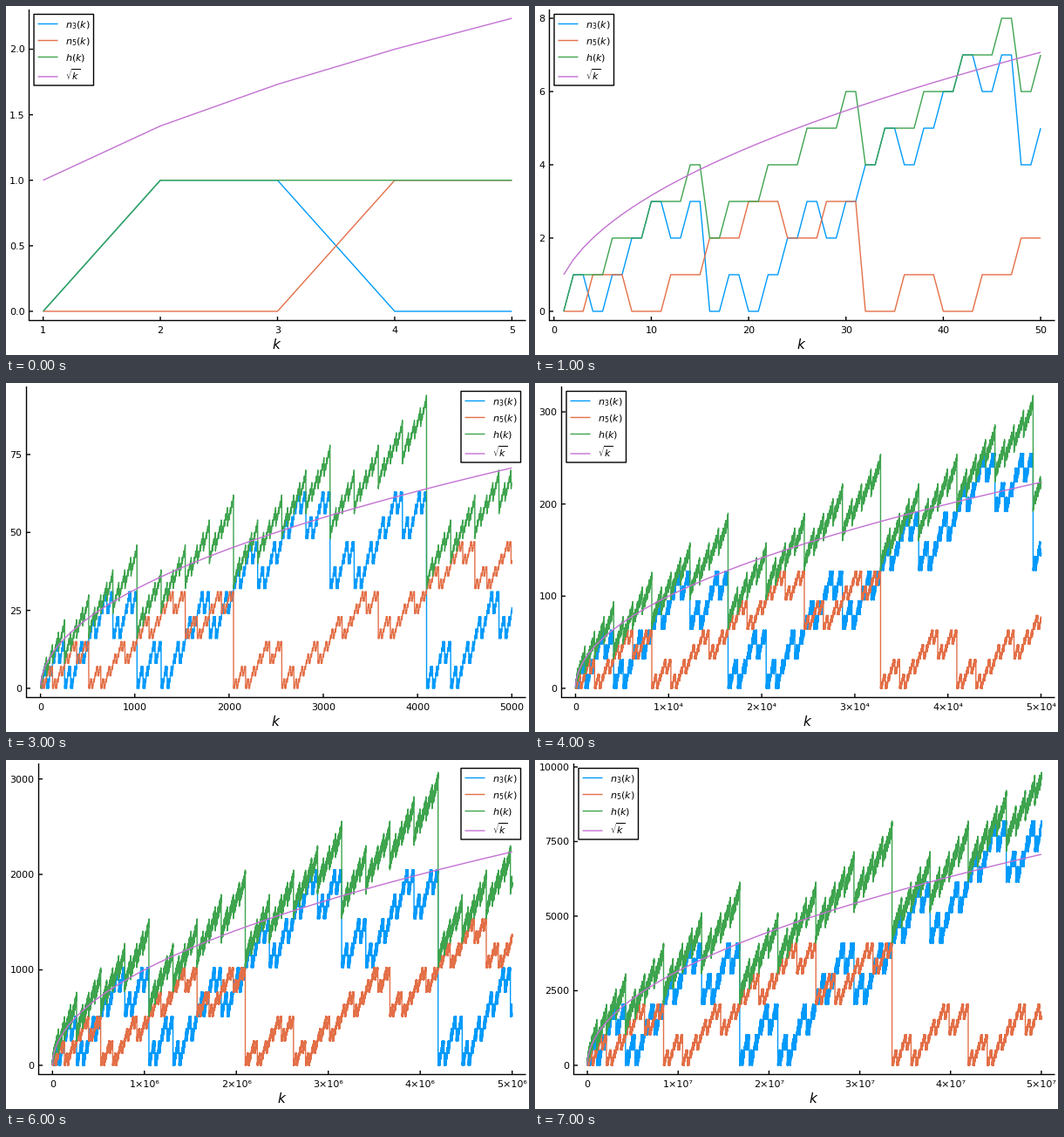
Animation, 600 px wide and 400 px high, one loop 8 s. Source, as a matplotlib script:

```python
import numpy as np
import matplotlib.pyplot as plt
from matplotlib.animation import FuncAnimation
from matplotlib.patches import Rectangle

W, H, DPI = 600, 400, 100
TOP, BOTTOM, RIGHT = 4, 360, 596
PAD = 0.03
BLUE, ORANGE, GREEN, PURPLE = "#009afa", "#e36f47", "#3ea44e", "#c371d2"
SERIES = [("$n_3(k)$", BLUE), ("$n_5(k)$", ORANGE),
          ("$h(k)$", GREEN), (r"$\sqrt{k}$", PURPLE)]
ROWS = (20.5, 39.5, 58.5, 81)
SUPERSCRIPT = "⁰¹²³⁴⁵⁶⁷⁸⁹"

# y tick step, left edge of the axes, legend on the right
VIEWS = [(0.5, 26, False), (2, 16, False), (5, 23, False), (25, 23, True),
         (100, 30, False), (200, 30, False), (1000, 37, True), (2500, 44, False)]

plt.rcParams.update({"font.family": "DejaVu Sans", "mathtext.fontset": "dejavusans",
                     "path.simplify": False})

fig = plt.figure(figsize=(W / DPI, H / DPI), dpi=DPI, facecolor="white")
ax = fig.add_axes([0, 0, 1, 1])


def every_other_bit(k, first):
    """Number formed by bits first, first + 2, first + 4, ... of k."""
    return sum(((k >> b) & 1) << ((b - first) // 2) for b in range(first, 27, 2))


def sample(n):
    """First and last k of short binary blocks: they hold each block's extremes."""
    block = 1
    while block * 16000 < n:
        block *= 2
    start = np.arange(0, n + 1, block)
    k = np.unique(np.concatenate([start, start + block - 1, [1, n]]))
    return k[(k >= 1) & (k <= n)]


def line(x, y, color, z=2):
    ax.plot(x, y, color=color, lw=1, zorder=z, snap=False,
            solid_capstyle="butt", solid_joinstyle="round")


def label(x, y, s, size=8, ha="center"):
    ax.text(x, y, s, fontsize=size, ha=ha, va="baseline", color="black", zorder=6)


def x_label(i, power):
    if i == 0:
        return "0"
    if power < 4:
        return str(i * 10 ** power)
    return f"{i}×10{SUPERSCRIPT[power]}"


def legend(x):
    ax.add_patch(Rectangle((x + 0.5, 9.5), 68.5, 81.5, fc="white", ec="black",
                           lw=1, joinstyle="round", snap=False, zorder=4))
    for (name, color), y in zip(SERIES, ROWS):
        line([x + 5, x + 28], [y, y], color, z=5)
        label(x + 36, y + 4.4, name, ha="left")


def draw(power):
    ax.clear()
    ax.set(xlim=(0, W), ylim=(H, 0))
    ax.axis("off")

    step, left, legend_right = VIEWS[power]
    n = 5 * 10 ** power
    k = sample(n)
    n3, n5 = every_other_bit(k, 1), every_other_bit(k, 2)
    curves = [n3, n5, n3 + n5, np.sqrt(k)]
    peak = max(c.max() for c in curves)

    def to_x(v):
        return left + 0.5 + (RIGHT - left) * ((v - 1) / (n - 1) + PAD) / (1 + 2 * PAD)

    def to_y(v):
        return BOTTOM - (BOTTOM - TOP) * (v / peak + PAD) / (1 + 2 * PAD)

    for c, (_, color) in zip(curves, SERIES):
        line(to_x(k), to_y(c), color)

    line([left + 0.5] * 2, [TOP, BOTTOM + 1], "black", z=3)
    line([left, RIGHT + 0.5], [BOTTOM + 0.5] * 2, "black", z=3)

    for i in range(1 if power == 0 else 0, 6):
        x = to_x(i * 10 ** power)
        line([x, x], [BOTTOM, BOTTOM - 4], "black", z=3)
        label(x, 375, x_label(i, power))

    top_value = peak * (1 + PAD)
    for v in np.arange(0, top_value, step):
        y = to_y(v)
        line([left, left + 5], [y, y], "black", z=3)
        label(left - 4.5, y + 3.95, f"{v:.1f}" if step < 1 else f"{v:.0f}", ha="right")

    label((left + RIGHT) / 2, 393, "$k$", size=11)
    legend(521.5 if legend_right else left + 5.5)
    return []


anim = FuncAnimation(fig, draw, frames=len(VIEWS), init_func=lambda: [],
                     interval=1000, repeat=True, repeat_delay=0, blit=False)
plt.show()
```
